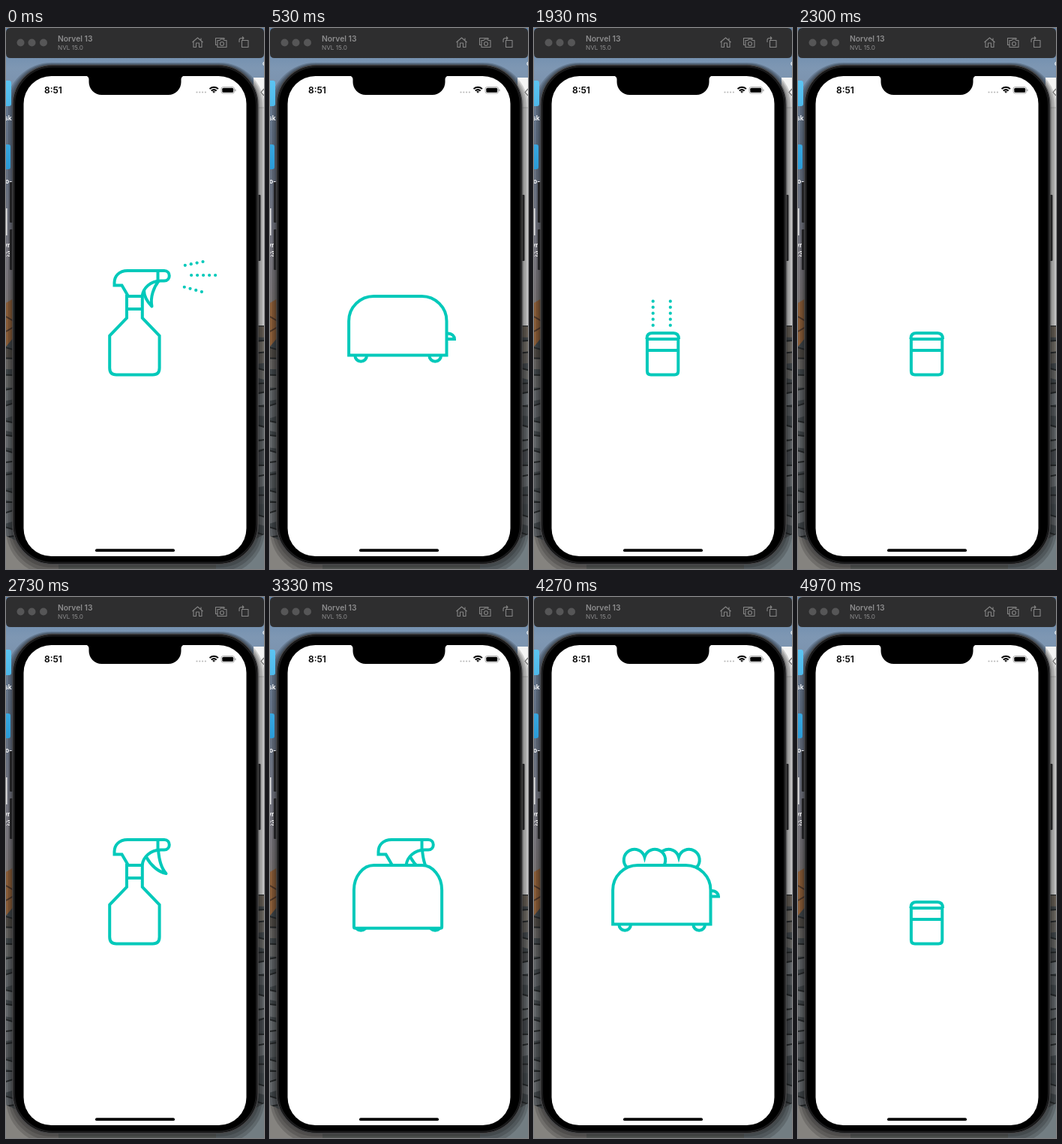
An HTML page that plays this animation: 344x720 px, repeating every 5010 ms.

```html
<!DOCTYPE html>
<html lang="en">
<head>
<meta charset="utf-8">
<title>Household icons</title>
<style>
  html, body { margin: 0; width: 100%; height: 100%; overflow: hidden; background: #34383b; }
  svg { display: block; width: 344px; height: 720px; }
  text { font-family: Inter, "Liberation Sans", sans-serif; }
  #icon { fill: #fff; stroke: #00c9ba; stroke-width: 4; stroke-linejoin: miter; }
  .line { fill: none; }
  .dots { fill: #00c9ba; stroke: none; }
  .tools { fill: none; stroke: #858585; stroke-width: 1.1; stroke-linejoin: round; }
  .shade rect { fill: none; stroke: #000; stroke-opacity: .16; }
</style>
</head>
<body>
<svg viewBox="0 0 344 720">
  <defs>
    <linearGradient id="sky" x2="0" y2="1">
      <stop offset="0" stop-color="#5f83aa"/>
      <stop offset=".13" stop-color="#7e97b3"/>
      <stop offset=".4" stop-color="#74839a"/>
      <stop offset=".75" stop-color="#8d8b95"/>
      <stop offset=".88" stop-color="#8b8688"/>
      <stop offset="1" stop-color="#8a7260"/>
    </linearGradient>
    <linearGradient id="folder" x2="0" y2="1">
      <stop offset="0" stop-color="#5cc4f2"/>
      <stop offset="1" stop-color="#2a9bd8"/>
    </linearGradient>
  </defs>

  <!-- desktop -->
  <rect width="344" height="410" fill="url(#sky)"/>
  <rect y="396" width="344" height="324" fill="#4a5155"/>
  <path d="M0 366L10 360V412L0 424Z" fill="#a06c42"/>
  <path d="M0 384L10 390M0 404L10 398" stroke="#5b4030" stroke-width="2"/>
  <g id="rocks"></g>
  <path d="M330 66H344V396H330Z" fill="#e9e9ea"/>
  <path d="M330 66H344V106H330Z" fill="#f4f4f4"/>
  <path d="M330 106H344" stroke="#c9c9c9"/>
  <g class="shade">
    <rect x="9" y="51" width="327" height="664" rx="52" stroke-width="6"/>
    <rect x="9" y="53" width="327" height="664" rx="52" stroke-width="12"/>
    <rect x="9" y="55" width="327" height="664" rx="52" stroke-width="18"/>
  </g>
  <path d="M0 70H4Q7 70 7 73V101Q7 104 4 104H0ZM0 155H3Q6 155 6 158V185Q6 188 3 188H0Z" fill="url(#folder)"/>
  <rect y="240" width="1.5" height="36" fill="#e4e4e4"/>
  <g fill="#fff" font-size="8.5" font-weight="600">
    <text x="-2" y="123">sk</text><text x="-1" y="207">o-</text>
    <text x="-3" y="292">yr</text><text x="-4" y="304">23</text>
    <text x="342" y="50">c</text>
  </g>
  <path d="M344 81L340 85.5L344 90" fill="none" stroke="#777" stroke-width="1.2"/>

  <!-- title bar -->
  <path d="M0 6Q0 0 6 0H338Q344 0 344 6V34Q344 40 338 40H6Q0 40 0 34Z" fill="#2e2e2f"/>
  <g fill="#565657"><circle cx="19.5" cy="19.5" r="5"/><circle cx="34.5" cy="19.5" r="5"/><circle cx="50" cy="19.5" r="5"/></g>
  <text x="69" y="18" font-size="10.3" font-weight="600" fill="#8d8d8e">Norvel 13</text>
  <text x="69" y="29" font-size="8.2" fill="#8d8d8e">NVL 15.0</text>
  <g class="tools">
    <path d="M248.500 19L255.500 13L262.500 19M250 18V25.500H253.500V20H257.500V25.500H261V18M260 16V13.500"/>
    <path d="M282 22.500H279.500V13.500H291V15M282 16.500H285L286 15H290L291 16.500H294V25.500H282Z"/>
    <circle cx="288" cy="21" r="2.5"/>
    <path d="M314.500 16.500H323V25.500H314.500ZM311 19V16Q311 13.500 314 13.500H317M315 11.500L317 13.500L315 15.500"/>
  </g>

  <!-- phone -->
  <g fill="#202022">
    <rect x="5" y="205" width="5" height="54" rx="1"/>
    <rect x="5" y="268" width="5" height="54" rx="1"/>
    <rect x="335" y="222" width="4.5" height="88" rx="1"/>
  </g>
  <rect x="9" y="49.5" width="327" height="664" rx="53" stroke="#454547" stroke-width="1.5"/>
  <rect x="11" y="51.5" width="323" height="660" rx="51" stroke="#1b1b1c" stroke-width="2"/>
  <rect x="23.5" y="64" width="297" height="639" rx="37" fill="#fff"/>
  <path d="M106 63.500Q110 64 110.500 68V72A17 17 0 0 0 127.500 89H216.500A17 17 0 0 0 233.500 72V68Q234 64 238 63.500Z"/>
  <text x="51" y="87" font-size="12" font-weight="600">8:51</text>
  <g fill="#b9b9b9"><circle cx="254.5" cy="85.5" r="1.1"/><circle cx="258.3" cy="85.5" r="1.1"/><circle cx="262.1" cy="85.5" r="1.1"/><circle cx="265.9" cy="85.5" r="1.1"/></g>
  <g fill="none" stroke="#000" stroke-width="2">
    <path d="M271.500 81Q277.200 76.500 283 81M273.700 83.500Q277.200 80.700 280.700 83.500"/>
    <path d="M275.800 84.800L277.200 86.300L278.600 84.800Q277.200 83.800 275.800 84.800Z" stroke-width="1"/>
  </g>
  <rect x="287" y="78.5" width="17.5" height="8.5" rx="2.5" fill="none" stroke="#999" stroke-width=".8"/>
  <rect x="288.3" y="79.8" width="14.9" height="5.9" rx="1.5"/>
  <rect x="305.3" y="81.3" width="1.2" height="3" rx=".6" fill="#999"/>
  <rect x="119" y="693.3" width="106" height="3.8" rx="1.9"/>

  <g id="icon">
    <g id="spray" class="dots"></g>
    <g id="steam" class="dots"></g>
    <g id="feet"><circle cx="121.2" cy="436" r="7.8"/><circle cx="220.2" cy="436" r="7.8"/></g>
    <path id="handle" d="M232 391H237C243 391 246 395 246 398.500H232Z"/>
    <g id="toasts">
      <path transform="translate(45.5 0)" d="M124 360A14.100 14.100 0 1 1 147.500 346.300A14.100 14.100 0 1 1 171 360V390H124Z"/>
      <path d="M124 360A14.100 14.100 0 1 1 147.500 346.300A14.100 14.100 0 1 1 171 360V390H124Z"/>
    </g>
    <g id="top">
      <path id="head"/>
      <g id="nozzle" class="line"><path d="M202.500 323V337"/><path id="trigger" stroke-linejoin="round"/></g>
    </g>
    <path id="body"/>
    <path id="band" class="line"/>
  </g>
</svg>
<script>
const LOOP = 5010, CYCLE = 3110;
const $ = id => document.getElementById(id);
const mix = (a, b, p) => a + (b - a) * p;
const ramp = (t, from, to) => Math.min(1, Math.max(0, (t - from) / (to - from)));
const outQuad = p => 1 - (1 - p) ** 2;
const outCubic = p => 1 - (1 - p) ** 3;
const inOut = p => p * p * (3 - 2 * p);
const outBack = p => 1 + 2.4 * (p - 1) ** 3 + 1.4 * (p - 1) ** 2;
const bump = (t, from, to) => Math.sin(Math.PI * ramp(t, from, to));
const show = (el, on) => el.setAttribute('visibility', on ? 'visible' : 'hidden');
const shift = (el, x, y) => el.setAttribute('transform', `translate(${x} ${y})`);

// Blends two paths that share the same commands.
function mixPath(a, b, p) {
  const ends = b.match(/[\d.]+/g);
  let i = 0;
  return a.replace(/[\d.]+/g, n => mix(+n, +ends[i++], p).toFixed(2));
}

const bottle = { cx: 171.4, w: 33.2, shoulder: 409.5, neck: 10.4, neckY: 386, top: 357, bottom: 461.5, r: 9, bulge: 0, band: 374 };
const toaster = { cx: 170.3, w: 65.2, shoulder: 390, neck: 32, neckY: 357, top: 357, bottom: 435.5, r: 0, bulge: .55, band: 357 };
const box = { cx: 171.6, w: 20.7, shoulder: 416, neck: 20.7, neckY: 414, top: 414, bottom: 461.5, r: 5, bulge: 0, band: 429 };

const sprayHead = 'M163 357L154.5 342.5H144.5V339C144.5 330 151 323 162 323H211C220 323 220 336.5 211 336.5H206C193 337 183 345 181.5 357';
const cap = 'M150.5 414L150.5 414H150.5V413C150.5 408 153 406 158 406H186C191 406 193 409 193 414H193C193 414 193 414 193 414';
const triggerOut = 'M203 336C204 350 207 361 213.5 368C203 366 193 357 187 346';
const triggerIn = 'M204 336C197 345 192 358 194.5 370.5C188 364 184 356 184 349';

const mixBody = (a, b, p) =>
  Object.fromEntries(Object.keys(a).map(k => [k, mix(a[k], b[k], p)]));

function bodyPath({ cx, w, shoulder, neck, neckY, top, bottom, r, bulge }) {
  const left = cx - w, right = cx + w, a = cx - neck, b = cx + neck;
  const rise = shoulder - bulge * (shoulder - neckY), run = bulge * (w - neck);
  return `M${left + r} ${bottom}Q${left} ${bottom} ${left} ${bottom - r}V${shoulder}` +
    `C${left} ${rise} ${a - run} ${neckY} ${a} ${neckY}V${top}H${b}V${neckY}` +
    `C${b + run} ${neckY} ${right} ${rise} ${right} ${shoulder}V${bottom - r}` +
    `Q${right} ${bottom} ${right - r} ${bottom}Z`;
}

function addDot(parent, x, y) {
  const dot = document.createElementNS('http://www.w3.org/2000/svg', 'circle');
  dot.setAttribute('r', 2.1);
  parent.append(dot);
  return { dot, x, y };
}

// Each jet: first dot, count, step between dots.
const sprayDots = [[238.7, 315.8, 4, 7.9, -1.6], [247, 329, 5, 8, 0], [237.7, 344.7, 4, 7.7, 2.1]]
  .flatMap(([x, y, n, dx, dy]) => Array.from({ length: n }, (_, i) =>
    ({ ...addDot($('spray'), x + i * dx, y + i * dy), slope: dy / dx })));
const steamDots = [158.7, 181.8].flatMap(x =>
  Array.from({ length: 5 }, (_, i) => addDot($('steam'), x, 364 + i * 8)));

function drawRocks() {
  let seed = 7;
  const rnd = () => (seed = seed * 16807 % 2147483647) / 2147483647;
  let out = '';
  for (const x of [-4, 328]) {
    for (let y = 424 - (x > 0 ? 28 : 0); y < 725; y += 13 + rnd() * 12) {
      const shade = 78 + rnd() * 40, lean = rnd() * 14 - 7;
      const warm = 14 * Math.max(0, 1 - (y - 396) / 90);
      out += `<path d="M${x} ${y}l20 ${lean}v${12 + rnd() * 7}l-20 ${-lean}z" fill="rgb(${shade + warm},${shade + 5},${shade + 9 - warm})"/>` +
        `<path d="M${x} ${y}l20 ${lean}" stroke="#2b2e30" stroke-width="2"/>`;
    }
  }
  out += '<path d="M0 676L70 708V720H0Z" fill="#85837f"/><path d="M270 714L344 674V720H270Z" fill="#727d82"/>' +
    '<path d="M70 708H280V720H70Z" fill="#6d716f"/>';
  $('rocks').innerHTML = out;
}

function bodyAt(c) {
  if (c < 1630) {
    // The shoulders fill out before the sides have finished spreading.
    const shape = mixBody(bottle, toaster, outQuad(ramp(c, 90, 330)));
    const { shoulder, neck, neckY, bulge } = mixBody(bottle, toaster, outCubic(ramp(c, 90, 210)));
    const band = shape.top + 17 * (1 - ramp(c, 90, 190));
    return { ...shape, shoulder, neck, neckY, bulge, band };
  }
  if (c < 2380) return mixBody(toaster, box, outCubic(ramp(c, 1630, 1760)));
  return mixBody(box, bottle, outBack(ramp(c, 2380, 2640)));
}

function drawTop(c) {
  const grow = c < 1000 ? 1 : outBack(ramp(c, 2380, 2640));
  $('head').setAttribute('d', mixPath(cap, sprayHead, grow));
  shift($('top'), 0, c < 1000 ? 46 * inOut(ramp(c, 230, 330)) : 0);
  show($('top'), c < 400 || c > 1630);

  const reach = c < 1000 ? 1 : ramp(c, 2560, 2680);
  show($('nozzle'), reach > 0 && (c < 400 || c > 1630));
  $('nozzle').setAttribute('transform', `translate(203 337) scale(${reach}) translate(-203 -337)`);
  const press = c < 1000 ? 1 - inOut(ramp(c, 30, 190)) : inOut(ramp(c, 2780, 2900));
  $('trigger').setAttribute('d', mixPath(triggerOut, triggerIn, press));
}

function drawToaster(c) {
  const out = 1 - ramp(c, 1590, 1640);
  show($('feet'), c > 180 && c < 1640);
  shift($('feet'), 0, -12 * (1 - out));
  show($('handle'), c > 330 && c < 1640);
  const slide = 16 * bump(c, 440, 660);
  shift($('handle'), -14 * (1 - outCubic(ramp(c, 330, 440)) * out), slide);

  const rise = outBack(ramp(c, 600, 860));
  const hop = 15 * bump(c, 620, 860);
  const sink = 46 * inOut(ramp(c, 1490, 1610));
  show($('toasts'), c > 590 && c < 1625);
  shift($('toasts'), 0, 46 * (1 - rise) - hop + sink);
}

function drawDots(c) {
  const s = c > 2000 ? c - CYCLE : c;
  const travel = s * .12;
  show($('spray'), s > -260 && s < 70);
  for (const { dot, x, y, slope } of sprayDots) {
    dot.setAttribute('cx', x + travel);
    dot.setAttribute('cy', y + travel * slope);
    dot.setAttribute('r', 2.1 * ramp(x + travel, 221, 226) * (1 - ramp(s, 20, 70)));
  }

  const lift = c < 1930 ? (c - 1930) * .67 : (c - 1930) * .32;
  show($('steam'), c > 1868 && c < 2260);
  for (const { dot, x, y } of steamDots) {
    dot.setAttribute('cx', x);
    dot.setAttribute('cy', y - lift);
    dot.setAttribute('r', 2.1 * ramp(y - lift, 274, 284) * (1 - ramp(c, 2170, 2260)));
  }
}

function draw(t) {
  const c = t % LOOP % CYCLE;
  const shape = bodyAt(c);
  shape.w += 5 * bump(c, 1560, 1700);
  $('body').setAttribute('d', bodyPath(shape));
  $('band').setAttribute('d', `M${shape.cx - shape.neck} ${shape.band}H${shape.cx + shape.neck}`);
  show($('band'), c < 190 || c > 1640);
  drawTop(c);
  drawToaster(c);
  drawDots(c);
}

drawRocks();
const start = performance.now();
function tick() {
  draw(performance.now() - start);
  requestAnimationFrame(tick);
}
tick();
</script>
</body>
</html>
```
